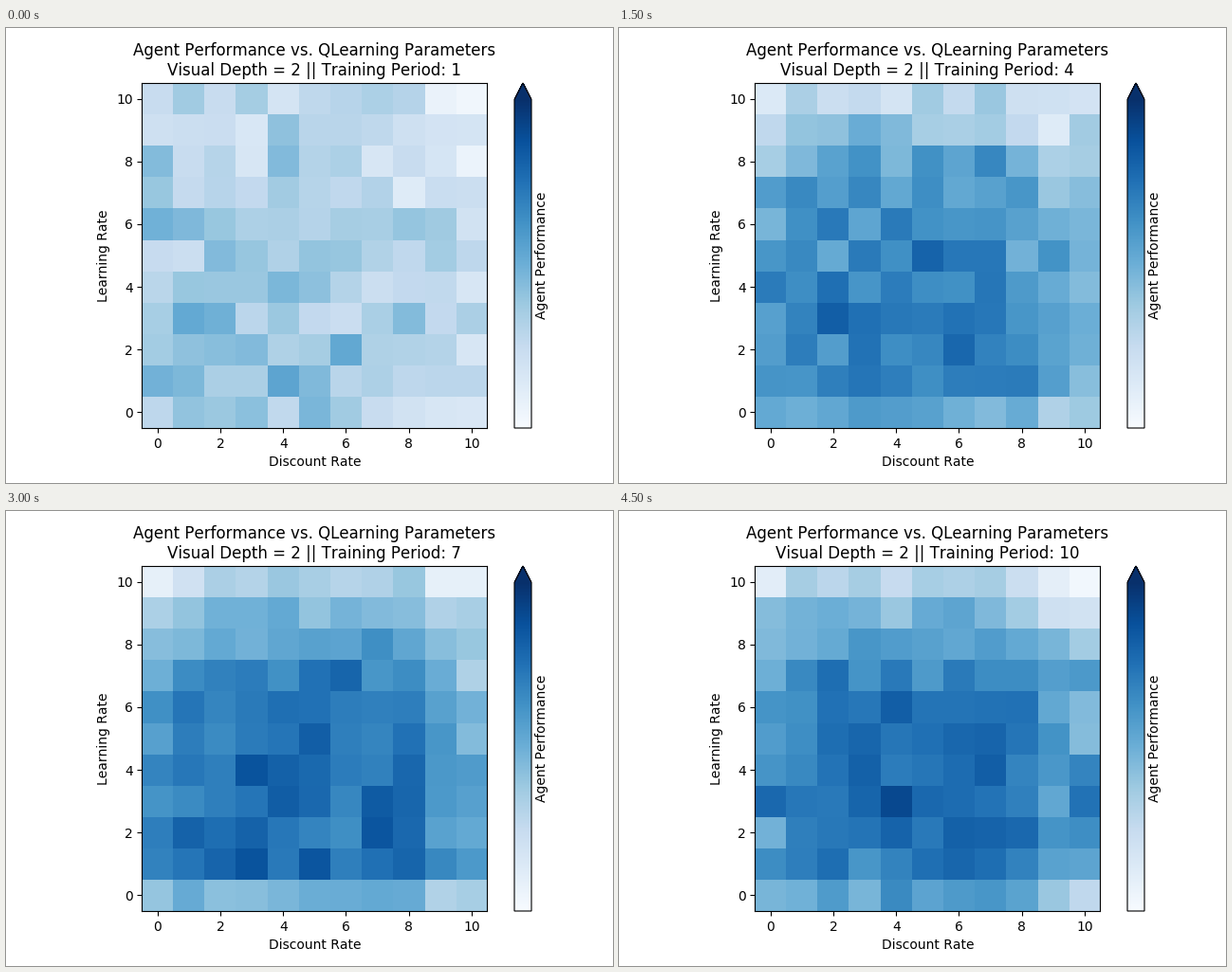
These frames come from a looping animation (640 px wide and 480 px high, 5000 ms). A matplotlib script:

```python
import numpy as np
import matplotlib.pyplot as plt
from matplotlib.animation import FuncAnimation

W, H, DPI = 640, 480, 100
PERIODS, STEP_MS = 10, 500
SIZE = 11

plt.rcParams.update({
    "font.family": "DejaVu Sans",
    "font.size": 10,
    "text.kerning_factor": 6,
})

# Learning rate runs down the grid, discount rate across it.
rate, discount = np.mgrid[0:SIZE, 0:SIZE]


def untrained():
    """Nearly flat, fading towards the highest rates."""
    return .38 - .11 * (rate / 10) ** 4 - .17 * (discount / 10) ** 4


def trained():
    """Broad plateau that falls off at every edge."""
    by_rate = .79 - .50 * (rate / 10) ** 4 - .23 * np.exp(-3 * rate)
    by_discount = (.12 * np.exp(-discount)
                   + .21 / (1 + np.exp(-4 * (discount - 8.5))))
    return by_rate - by_discount


def performance(period):
    """Scores rise and level off, with scatter from run to run."""
    learned = 1 - np.exp(-(period - 1) / 2)
    grid = (1 - learned) * untrained() + learned * trained()
    rng = np.random.default_rng(40 + period)
    grid += rng.normal(0, .085 - .025 * learned, grid.shape)
    return np.clip(grid, 0, 1)


def title(period):
    return ("Agent Performance vs. QLearning Parameters\n"
            f"Visual Depth = 2 || Training Period: {period}")


def place(x, y, w, h):
    return fig.add_axes([x / W, y / H, w / W, h / H])


fig = plt.figure(figsize=(W / DPI, H / DPI), dpi=DPI, facecolor="white")
ax = place(143.3, 58, 364, 364)
image = ax.imshow(performance(1), cmap="Blues", vmin=0, vmax=1,
                  origin="lower", aspect="auto", interpolation="nearest")
ax.set_xticks(range(0, SIZE, 2))
ax.set_yticks(range(0, SIZE, 2))
ax.set_xlabel("Discount Rate")
ax.set_ylabel("Learning Rate")
heading = ax.set_title(title(1), fontsize=12)

bar_ax = place(536, 58, 18, 364)
fig.colorbar(image, cax=bar_ax, extend="max", ticks=[])
fig.text(565 / W, 240 / H, "Agent Performance", rotation=90,
         ha="center", va="center")


def update(frame):
    period = frame + 1
    image.set_data(performance(period))
    heading.set_text(title(period))
    return image, heading


anim = FuncAnimation(fig, update, frames=PERIODS, interval=STEP_MS,
                     repeat=True, repeat_delay=0, blit=False)
plt.show()
```
